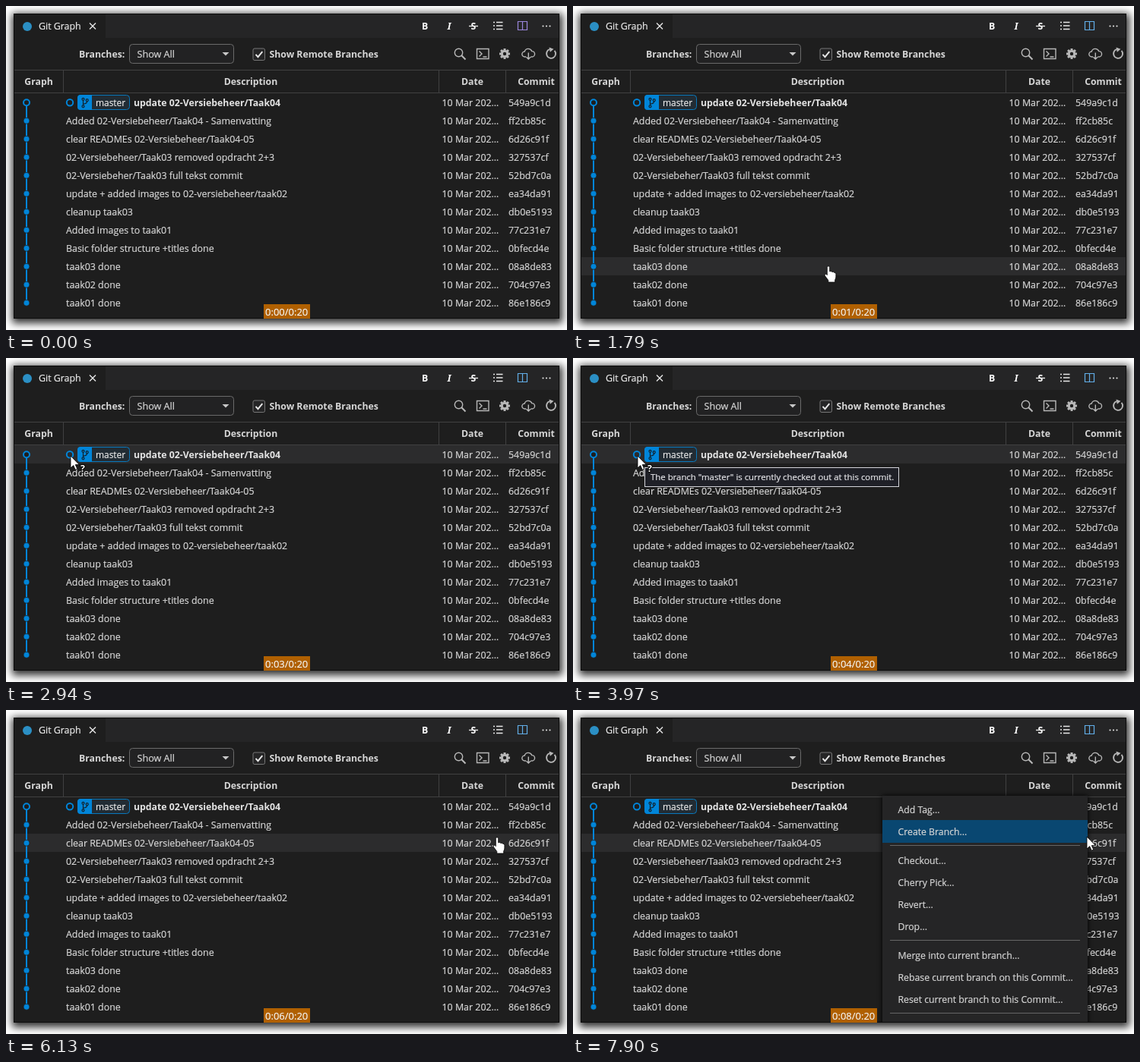
An HTML page for the animation above (8 s loop, 738 px wide and 427 px high).

```html
<!DOCTYPE html>
<html lang="en">
<head>
<meta charset="utf-8">
<title>Git Graph</title>
<style>
  html, body { margin: 0; width: 100%; height: 100%; overflow: hidden; background: #fff; }
  #win { position: absolute; left: 10px; top: 10px; width: 718px; height: 402px; background: #1e1e1e;
         box-shadow: 1px 3px 10px 3px rgba(0, 0, 0, .82); }
  svg { position: absolute; left: 0; top: 0; display: block; }
  text { font: 12.42px "Open Sans", "Noto Sans", sans-serif; fill: #d6d6d6; white-space: pre;
         stroke: #d6d6d6; stroke-width: .2; }
  .b { font-size: 12.27px; font-weight: 700; stroke: none; }
  .mid { text-anchor: middle; }
  .menu { font-size: 12.27px; }
  .tip { font-size: 11.4px; fill: #e6e6ea; stroke: #e6e6ea; }
  .ico { fill: none; stroke: #b8b8b8; stroke-width: 1.4; }
  .line { stroke: #404041; }
  .blue { stroke: #0085d9; stroke-width: 2; }
</style>
</head>
<body>
<div id="win"></div>
<svg id="stage" width="738" height="427" viewBox="0 0 738 427"></svg>
<script>
const LOOP = 8000, STEP = 77, ROW = 24, TOP = 115;

const commits = [
  ['update 02-Versiebeheer/Taak04', '549a9c1d'],
  ['Added 02-Versiebeheer/Taak04 - Samenvatting', 'ff2cb85c'],
  ['clear READMEs 02-Versiebeheer/Taak04-05', '6d26c91f'],
  ['02-Versiebeheer/Taak03 removed opdracht 2+3', '327537cf'],
  ['02-Versiebeher/Taak03 full tekst commit', '52bd7c0a'],
  ['update + added images to 02-versiebeheer/taak02', 'ea34da91'],
  ['cleanup taak03', 'db0e5193'],
  ['Added images to taak01', '77c231e7'],
  ['Basic folder structure +titles done', '0bfecd4e'],
  ['taak03 done', '08a8de83'],
  ['taak02 done', '704c97e3'],
  ['taak01 done', '86e186c9']
];

const menuItems = [
  [131, 'Add Tag...'], [160, 'Create Branch...'],
  [198, 'Checkout...'], [227, 'Cherry Pick...'], [256, 'Revert...'], [285, 'Drop...'],
  [323, 'Merge into current branch...'], [352, 'Rebase current branch on this Commit...'],
  [381, 'Reset current branch to this Commit...']
];

// time, x, y of the pointer tip
const path = [
  [1480, 425, 408], [1790, 335, 343], [2330, 141, 178], [2560, 106, 149], [2940, 85, 129],
  [4745, 85, 129], [4750, 94, 130], [4980, 200, 134], [5290, 376, 138], [5520, 485, 138.5],
  [5590, 512, 143], [5830, 590, 157], [6130, 645, 167.5], [6360, 670, 171], [6440, 672, 171],
  [6745, 672, 171], [6750, 674, 169], [6829, 676, 167]
];
const seconds = [1000, 2020, 2940, 3970, 4980, 5980, 6970, 7900];

const text = (x, y, s, cls = '', more = '') => `<text x="${x}" y="${y}" class="${cls}" ${more}>${s}</text>`;
const rect = (x, y, w, h, fill, more = '') =>
  `<rect x="${x}" y="${y}" width="${w}" height="${h}" fill="${fill}" ${more}/>`;
const line = (x1, y1, x2, y2, cls = 'line', more = '') =>
  `<line x1="${x1}" y1="${y1}" x2="${x2}" y2="${y2}" class="${cls}" ${more}/>`;
const shape = (d, more = 'class="ico"') => `<path d="${d}" ${more}/>`;
const ring = (x, y, r, more) => `<circle cx="${x}" cy="${y}" r="${r}" ${more}/>`;

function tabBar() {
  const white = 'fill="none" stroke="#e8e8e8" stroke-width="1.4"';
  return rect(131, 10, 597, 32, '#252526')
    + ring(28, 27, 6, 'fill="#2b8fc4"')
    + text(43, 31, 'Git Graph', '', 'style="fill:#f0f0f0"')
    + shape('M110 22.5l8 8m0-8l-8 8', white)
    + text(551, 30.5, 'B', 'b mid', 'style="fill:#fff"')
    + text(583, 30.5, 'I', 'b mid', 'style="fill:#fff;font-family:Noto Serif,serif;font-style:italic"')
    + text(615, 30.5, 'S', 'b mid', 'style="fill:#fff"')
    + shape('M609 26.5h12', white)
    + shape('M641 21.5h2m2 0h8.5M641 26h2m2 0h8.5M641 30.5h2m2 0h8.5', white)
    + '<path id="split" d="M673.5 20.5h12v11h-12zM679.5 20.5v11" fill="none" stroke-width="1.2"/>'
    + [706.5, 711, 715.5].map(x => ring(x, 26.5, 1.1, 'fill="#e0e0e0"')).join('');
}

function toolbar() {
  let teeth = '';
  for (let a = 0; a < 360; a += 45)
    teeth += rect(654.5, 56, 3, 4, '#b8b8b8', `transform="rotate(${a} 656 63)"`);
  return text(96, 67.5, 'Branches:', 'b')
    + rect(162.5, 50.5, 137, 25, '#222223', 'rx="4" stroke="#6a6a6a"')
    + text(172.5, 67.5, 'Show All', '', 'style="font-size:12.6px"')
    + shape('M284.5 61h9l-4.5 4.5z', 'fill="#c8c8c8"')
    + rect(325, 56, 15.5, 15.5, '#252526', 'rx="2" stroke="#777"')
    + shape('M328.5 63.8l3 3.4 5.8-7', 'fill="none" stroke="#e8e8e8" stroke-width="1.9"')
    + text(346.5, 67.5, 'Show Remote Branches', 'b')
    + ring(595.5, 61.5, 5.2, 'class="ico"') + shape('M599.3 65.3l5.2 5.2', 'class="ico" style="stroke-width:2"')
    + shape('M619.5 56.5h15.5v13h-15.5zM622.5 59.5l3.5 3.5-3.5 3.5M627.5 67h5')
    + teeth + ring(656, 63, 3.7, 'fill="none" stroke="#b8b8b8" stroke-width="3"')
    + shape('M684 67h-1.5a3.5 3.5 0 0 1-.3-7 5 5 0 0 1 9.5-.4 3.7 3.7 0 0 1 .3 7.4h-1.5M687.3 61.5v8.5m-2.8-2.8l2.8 2.8 2.8-2.8')
    + shape('M721.5 58.8a6 6 0 1 1-6.5-1.6', 'class="ico" style="stroke-width:1.9"')
    + shape('M714.5 54.5l6 2.2-4.7 4z', 'fill="#b8b8b8"');
}

function table() {
  let out = line(10, 84.5, 728, 84.5) + line(10, 114.5, 728, 114.5);
  for (const x of [75.5, 569.5, 657.5]) out += line(x, 84, x, 114);
  for (const [x, s] of [[43, 'Graph'], [322, 'Description'], [613.5, 'Date'], [697.5, 'Commit']])
    out += text(x, 104, s, 'b mid');
  out += '<g id="hover">' + rect(10, 0, 718, ROW, '#2c2c2d') + '</g>';
  out += line(27, 127.5, 27, 391.5, 'blue');
  commits.forEach(([title, hash], i) => {
    const y = 132 + ROW * i, cy = 127.3 + ROW * i;
    out += i ? ring(27, cy, 4, 'fill="#0085d9" stroke="#1e1e1e" stroke-opacity=".75"')
             : ring(27, cy, 4, 'fill="#1e1e1e" class="blue"');
    out += text(i ? 79 : 168, y, title, i ? '' : 'b', i ? '' : 'style="fill:#e4e4e4"')
      + text(573.5, y, '10 Mar 202…') + text(661, y, hash);
  });
  return out + badge();
}

function badge() {
  const dark = 'fill="none" stroke="#12212c" stroke-width="1.2"';
  return ring(84, 127.3, 4.2, 'fill="none" class="blue"')
    + rect(94.5, 117.5, 68, 19, '#222c34', 'rx="4" stroke="#0878bd"')
    + shape('M113 117h-15a4 4 0 0 0-4 4v12a4 4 0 0 0 4 4h15z', 'fill="#0085d9"')
    + ring(101.5, 122.8, 1.5, dark) + ring(101.5, 132.3, 1.5, dark) + ring(106.7, 124.2, 1.5, dark)
    + shape('M101.5 124.3v6.5M106.7 125.7q0 2.8-5.2 3.5', dark)
    + text(118, 132, 'master', '', 'style="font-size:11.9px;fill:#f0f0f0"');
}

const tooltip = (id, x, y, w, s) => `<g id="${id}">`
  + rect(x + .5, y + .5, w, 25, '#1f2027', 'stroke="#d4d4da"') + text(x + 8, y + 17, s, 'tip') + '</g>';

const menu = () => '<g id="menu">'
  + rect(407, 113, 270, 310, '#252526', 'style="filter:drop-shadow(0 0 3px #000)"')
  + rect(407, 145, 270, 30, '#094771', 'id="pick"')
  + [178.5, 303.5, 399.5].map(y => line(417, y, 667, y, '', 'stroke="#666"')).join('')
  + menuItems.map(([y, s]) => text(427.5, y + 4.5, s, 'menu')).join('') + '</g>';

const pointer = () => '<g id="pointer" stroke="#000" stroke-width=".8" fill="#fff">'
  + shape('M-1.7 1.5a1.7 1.7 0 0 1 3.4 0V6.8q2.4-.8 3 .6 2.2-.5 2.8.8 2.4-.3 2.4 2V14q0 2-1.2 4V21H-.2V18.5Q-2 16-4.6 12.6-5.6 10.4-3.6 10.2-2.6 10.4-1.7 11.6Z', 'id="hand"')
  + shape('M0 0V16L3.7 12.6 6.2 18.2 8.7 17.1 6.3 11.6H11.3Z', 'id="arrow"')
  + text(13, 21, '?', 'b', 'id="help" style="fill:#fff;stroke:#000;stroke-width:2;paint-order:stroke"') + '</g>';

const stage = document.getElementById('stage');
stage.innerHTML = '<clipPath id="clip"><rect x="10" y="10" width="718" height="402"/></clipPath><g clip-path="url(#clip)">'
  + tabBar() + toolbar() + table()
  + tooltip('branchTip', 94, 144, 334, 'The branch "master" is currently checked out at this commit.')
  + tooltip('hashTip', 594, 181, 290, '6d26c91f4b07e3a85d12c96f')
  + menu()
  + rect(10.5, 10.5, 717, 401, 'none', 'stroke="#0c0c0c"')
  + rect(339, 393, 61, 19, '#b06000')
  + text(341, 408, '', '', 'id="clock" style="font-size:13px;fill:#fff"')
  + pointer() + '</g>';

const el = id => document.getElementById(id);
const show = (id, on) => el(id).setAttribute('visibility', on ? 'visible' : 'hidden');

function pointerAt(t) {
  const base = t < 4750 ? 1480 : 4750;
  const q = base + STEP * Math.floor((t - base + 8) / STEP);
  const i = path.findIndex(p => p[0] > q);
  if (i < 0) return path[path.length - 1].slice(1);
  if (i === 0) return path[0].slice(1);
  const [a, b] = [path[i - 1], path[i]], k = (q - a[0]) / (b[0] - a[0]);
  return [a[1] + (b[1] - a[1]) * k, a[2] + (b[2] - a[2]) * k];
}

function draw(t) {
  const [x, y] = pointerAt(t);
  const inside = t >= 1480, helping = t >= 2940 && t < 4750, menuArrow = t >= 7590;
  const row = Math.min(11, Math.max(0, Math.floor((y - TOP) / ROW)));
  el('split').setAttribute('stroke', t < 70 ? '#9a86dc' : '#62aee8');
  el('clock').textContent = `0:0${seconds.filter(s => s <= t).length}/0:20`;
  el('hover').setAttribute('transform', `translate(0 ${TOP + ROW * row})`);
  el('pointer').setAttribute('transform', `translate(${Math.round(x)} ${Math.round(y)})`);
  show('hover', inside);
  show('hand', inside && !helping && !menuArrow);
  show('arrow', helping || menuArrow);
  show('help', helping);
  show('branchTip', t >= 3420 && t < 4750);
  show('hashTip', t >= 7370 && t < 7510);
  show('menu', t >= 7510);
  show('pick', menuArrow);
}

const start = performance.now();
function tick() {
  draw((performance.now() - start) % LOOP);
  requestAnimationFrame(tick);
}
tick();
</script>
</body>
</html>
```
